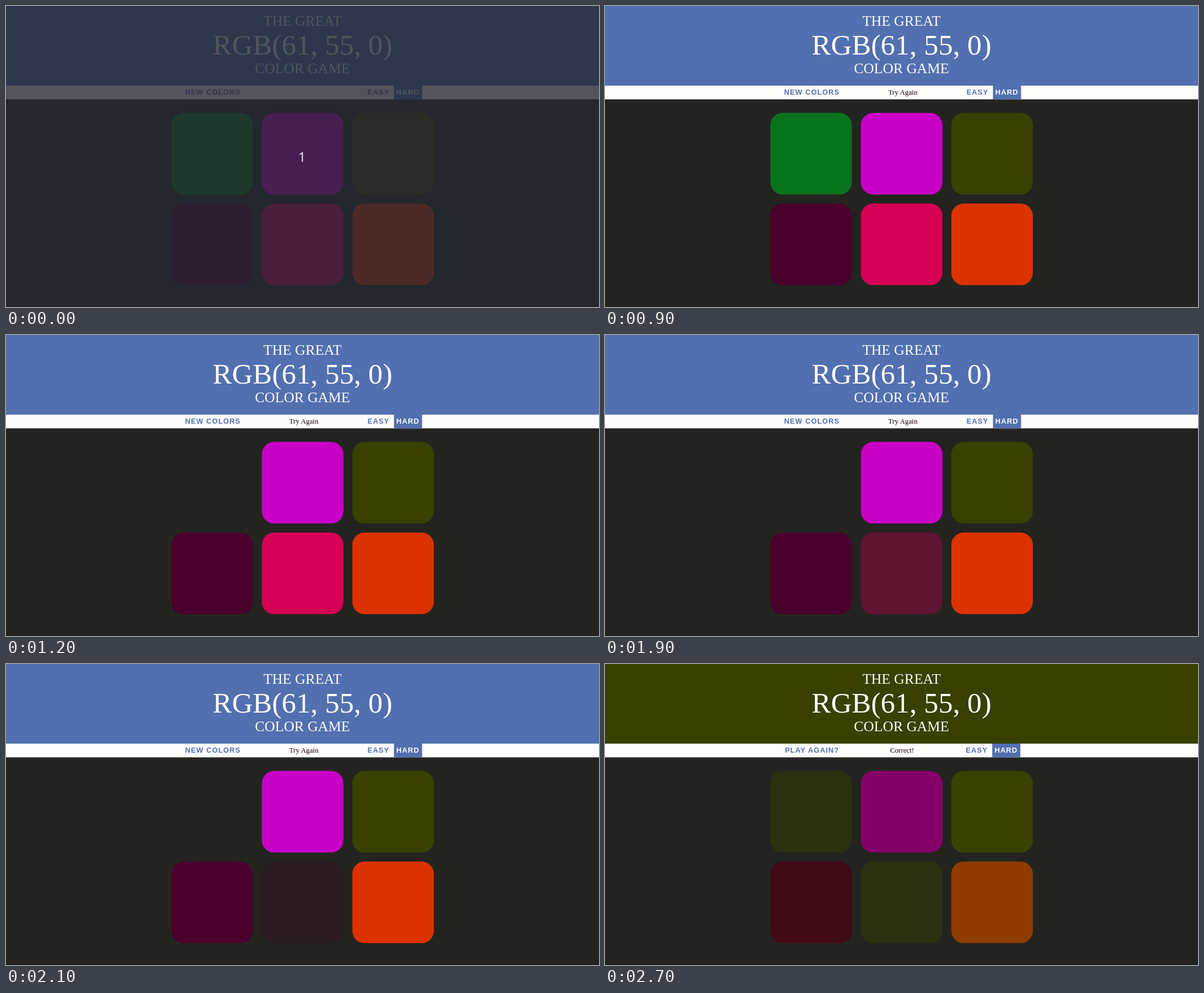
An HTML page for the animation above (2800 ms loop, 1051x533 px).

```html
<!DOCTYPE html>
<html lang="en">
<head>
<meta charset="utf-8">
<title>Color game</title>
<style>
  html, body { margin: 0; width: 100%; height: 100%; overflow: hidden; background: #232420; }
  svg { display: block; width: 1051px; height: 533px; }
  svg * { animation: 2800ms step-end infinite; }

  .title { font: 25.6px "Liberation Serif", serif; fill: #fdfdfb; text-anchor: middle; }
  .title .big { font-size: 51.2px; }
  .button { font: bold 12.8px "Liberation Sans", sans-serif; letter-spacing: 1px; fill: #5270b0; }
  .message { font: 12.8px "Liberation Serif", serif; fill: #1a0006; }
  .count { font: 24px "Noto Sans", sans-serif; fill: #e8deee; text-anchor: middle; }

  .tile { width: 144.5px; height: 144.5px; rx: 21.7px; }
  .header { fill: #5270b0; animation-name: header; }
  .green { fill: #08781d; animation-name: green; }
  .magenta { fill: #c800c6; animation-name: magenta; }
  .olive { fill: #384100; }
  .plum { fill: #4a002c; animation-name: plum; }
  .pink { fill: #d50055; animation-name: pink; }
  .orange { fill: #db3200; animation-name: orange; }

  .countdown { animation-name: countdown; }
  .retry { visibility: hidden; animation-name: retry; }
  .playing { animation-name: playing; }
  .won { visibility: hidden; animation-name: won; }

  @keyframes countdown { 3.571%, 100% { visibility: hidden; } }
  @keyframes retry {
    32.142% { visibility: visible; }
    92.857%, 100% { visibility: hidden; }
  }
  @keyframes playing { 92.857%, 100% { visibility: hidden; } }
  @keyframes won { 92.857%, 100% { visibility: visible; } }
  @keyframes header { 92.857%, 100% { fill: #384100; } }

  /* Wrong guesses fade into the page */
  @keyframes green {
    32.142% { fill: #08731d; }
    35.714% { fill: #12581e; }
    39.285% { fill: #1b3d1f; }
    42.857% { fill: #232420; }
    92.857% { fill: #24281b; }
    96.428%, 100% { fill: #2b3010; }
  }
  @keyframes pink {
    60.714% { fill: #ce0053; }
    64.285% { fill: #990c43; }
    67.857% { fill: #601432; }
    71.428% { fill: #3e1b28; }
    75% { fill: #2a1c22; }
    92.857% { fill: #24281b; }
    96.428%, 100% { fill: #2b3010; }
  }

  /* A win turns every tile towards the answer */
  @keyframes magenta {
    92.857% { fill: #b000a2; }
    96.428%, 100% { fill: #850068; }
  }
  @keyframes plum {
    92.857% { fill: #450026; }
    96.428%, 100% { fill: #400b14; }
  }
  @keyframes orange {
    92.857% { fill: #c03503; }
    96.428%, 100% { fill: #913b00; }
  }
</style>
</head>
<body>
<svg viewBox="0 0 1051 533">
  <rect width="1051" height="533" fill="#232420"/>
  <rect class="header" width="1051" height="141"/>
  <g class="title">
    <text x="525.5" y="35">THE GREAT</text>
    <text x="525.5" y="86" class="big">RGB(61, 55, 0)</text>
    <text x="525.5" y="119">COLOR GAME</text>
  </g>

  <rect y="141" width="1051" height="24.3" fill="#fdfdfb"/>
  <g class="button playing">
    <text x="317.6" y="157">NEW COLORS</text>
    <text x="640.7" y="157">EASY</text>
    <rect x="687.6" y="141" width="49.8" height="24.3"/>
    <text x="691.7" y="157" fill="#fdfdfb" style="fill: #fdfdfb">HARD</text>
  </g>
  <g class="button won">
    <text x="318.9" y="157">PLAY AGAIN?</text>
    <text x="639.4" y="157">EASY</text>
    <rect x="686.3" y="141" width="49.8" height="24.3"/>
    <text x="690.4" y="157" style="fill: #fdfdfb">HARD</text>
  </g>
  <g class="message">
    <text class="retry" x="502" y="157">Try Again</text>
    <text class="won" x="505.2" y="157">Correct!</text>
  </g>

  <rect class="tile green" x="293" y="189.3"/>
  <rect class="tile magenta" x="453.5" y="189.3"/>
  <rect class="tile olive" x="613.8" y="189.3"/>
  <rect class="tile plum" x="293" y="349.8"/>
  <rect class="tile pink" x="453.5" y="349.8"/>
  <rect class="tile orange" x="613.8" y="349.8"/>
  <rect y="532" width="1051" height="1" fill="#1b1c19"/>

  <g class="countdown">
    <rect width="1051" height="533" fill="#262832" fill-opacity=".79"/>
    <text class="count" x="524.5" y="276">1</text>
  </g>
</svg>
</body>
</html>
```
